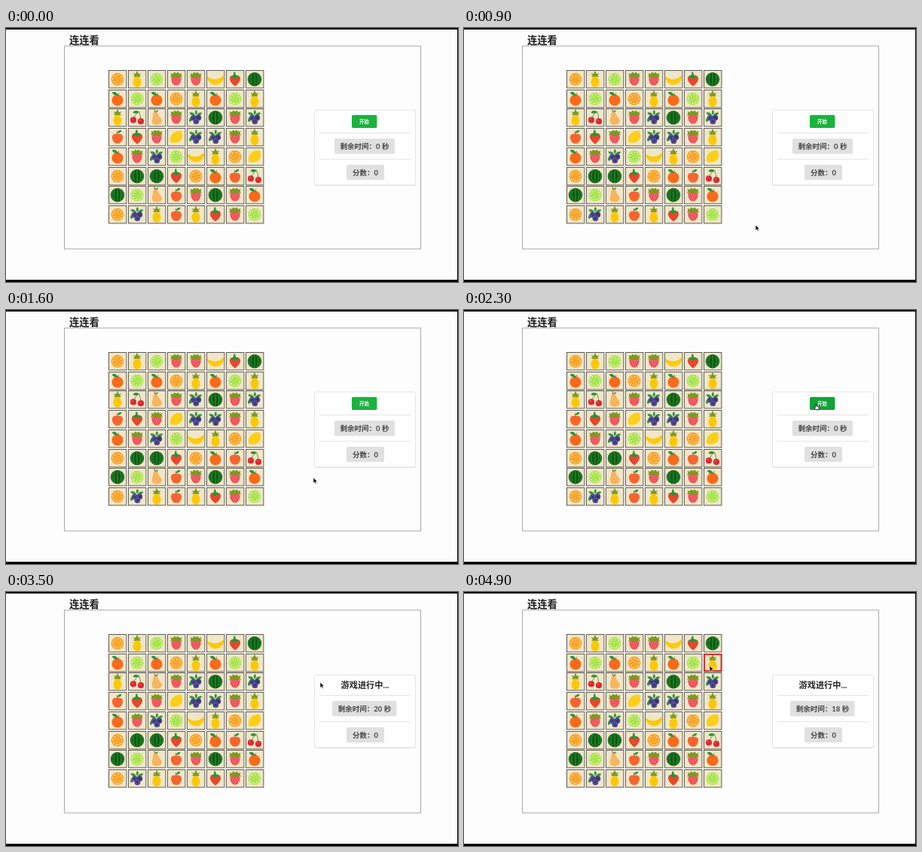
Recreate the animation shown at these times as an HTML page. Size 600 by 338 pixels, loop 5000 ms.

```html
<!DOCTYPE html>
<html lang="zh-CN">
<head>
<meta charset="utf-8">
<title>连连看</title>
<style>
  html, body { margin: 0; width: 100%; height: 100%; overflow: hidden; background: #fdfdfd; }
  svg { display: block; width: 600px; height: 338px; }
  text { font-family: Lato, "Noto Sans CJK SC", "Noto Sans CJK", sans-serif; font-weight: 700; }
  .mid { text-anchor: middle; }
  .label { font-size: 9.5px; fill: #454545; }
  .chip { fill: #e0e0e0; }
  .rule { stroke: #e4e4e4; }
</style>
</head>
<body>
<svg id="stage" viewBox="0 0 600 338">
  <rect width="600" height="338" fill="#fdfdfd"/>
  <path d="M0 0H600V338H0V335H599V2H0Z" fill="#000"/>
  <text x="84" y="20.8" font-size="13.3" fill="#1c1c1c">连连看</text>
  <rect x="77.5" y="24" width="473" height="270" fill="none" stroke="#a8a8a8"/>
  <g id="board"></g>
  <rect id="pick" x="319" y="83" width="22.5" height="22" fill="none" stroke="#e3211c" stroke-width="1.8"/>

  <g id="idle">
    <rect x="409.5" y="110" width="134.5" height="100" rx="2" fill="#dcdcdc"/>
    <rect x="409.5" y="109" width="134" height="100" rx="2" fill="#fefefe" stroke="#e4e4e4"/>
    <rect id="button" x="459" y="115.8" width="33.4" height="17.2" rx="1.8"/>
    <text class="mid" x="475.5" y="127" font-size="6.4" fill="#fff">开始</text>
    <path class="rule" d="M416 139.7H537M416 174.7H537"/>
    <rect class="chip" x="436" y="147.3" width="80" height="20.2" rx="2"/>
    <text class="mid label" x="476" y="160.9">剩余时间：0 秒</text>
    <rect class="chip" x="452" y="182" width="50" height="20.2" rx="2"/>
    <text class="mid label" x="477" y="195.8">分数：0</text>
  </g>

  <g id="running">
    <rect x="409.5" y="111.5" width="134.5" height="96.5" rx="2" fill="#dcdcdc"/>
    <rect x="409.5" y="110.5" width="134" height="96.5" rx="2" fill="#fefefe" stroke="#e4e4e4"/>
    <text class="mid" x="476.5" y="128" font-size="11.2" fill="#262626">游戏进行中...</text>
    <path class="rule" d="M416 137.5H537M416 172.5H537"/>
    <rect class="chip" x="433" y="145" width="85.5" height="20.2" rx="2"/>
    <text id="clock" class="mid label" x="476" y="158.8"></text>
    <rect class="chip" x="452" y="180" width="50" height="20.2" rx="2"/>
    <text class="mid label" x="477" y="193.8">分数：0</text>
  </g>

  <g id="cursor">
    <path id="arrow" d="M0 0V7.4L1.8 5.9L3 8.6L4.3 8L3.1 5.5H5.4Z" fill="#0a0a0a" stroke="#fff" stroke-width=".6"/>
    <path id="hand" d="M1 .6Q2-.5 2.6.8L3 3L5.3 3.5Q6.6 3.8 6.3 5.2L5.7 7.8H2.3L-.2 5Q-.6 3.8 .6 4.1L1.5 4.7Z" fill="#fff" stroke="#111" stroke-width=".9"/>
  </g>
</svg>

<script>
const $ = id => document.getElementById(id);

const path = (d, fill) => `<path d="${d}" fill="${fill}"/>`;
const line = (d, color, width = 1) =>
  `<path d="${d}" fill="none" stroke="${color}" stroke-width="${width}" stroke-linecap="round"/>`;
const disc = (x, y, r, fill) => `<circle cx="${x}" cy="${y}" r="${r}" fill="${fill}"/>`;
const oval = (x, y, rx, ry, fill, turn = 0) =>
  `<ellipse cx="${x}" cy="${y}" rx="${rx}" ry="${ry}" fill="${fill}" transform="rotate(${turn} ${x} ${y})"/>`;

const slice = (rim, pith, flesh) =>
  disc(12, 12.3, 8.3, rim) + disc(12, 12.3, 6.9, pith) +
  `<circle cx="12" cy="12.3" r="3.1" fill="none" stroke="${flesh}" stroke-width="6.2"
    pathLength="80" stroke-dasharray="8.2 1.8" transform="rotate(12 12 12.3)"/>`;

// Rows of seeds, each narrower than the one above
const seeds = (color, r) => {
  let s = "";
  for (let row = 0; row < 4; row++)
    for (let i = 0; i < 4 - row; i++)
      s += disc(12 + (i - (3 - row) / 2) * 3, 11.6 + row * 2.5, r, color);
  return s;
};

const fruits = {
  O: slice("#f7960f", "#fde0a0", "#f79b17"),
  L: slice("#a6e24a", "#e6f9bd", "#9fe13c"),
  P: path("M12 10L6.5 8.2L9 7.2L6.6 4.2L10 5L12 .8L14 5L17.4 4.2L15 7.2L17.5 8.2Z", "#7b9a22") +
     oval(12, 15.8, 5.5, 7.3, "#fdcb05") +
     line("M8 12.5L15.5 21M10 10L17 17.5M16 12.5L8.5 21M14 10L7 17.5", "#f3b808", .4),
  R: path("M5.4 11Q6 8 12 8Q18 8 18.6 11Q18.8 16 15.5 19.3Q12 22 8.5 19.3Q5.2 16 5.4 11Z", "#f0525a") +
     seeds("#f68a8d", .7) +
     path("M4 9.8L5.4 7L4.6 4.2L8 5L9.4 2.6L12 4.2L14.6 2.6L16 5L19.4 4.2L18.6 7L20 9.8L15.6 8.8L12 10.6L8.4 8.8Z", "#7b9a22"),
  B: path("M.8 8.6Q6 12.4 12 12.2Q18 11.8 22 7.4L23.4 8.6Q22.6 15.6 17 18.6Q10.5 21 5 17Q1.2 13.6 .8 8.6Z", "#fdcb0c") +
     line("M2 11Q11 18 22 9.8", "#f3b808", .5),
  S: path("M4.8 11Q5.5 7.4 12 8Q18.5 7.4 19.2 11Q18.8 16.5 12 21.6Q5.2 16.5 4.8 11Z", "#ea412b") +
     seeds("#f7a355", .4) +
     path("M5 8.6L9.8 6.6L10.4 2.6L12.2 2.4L12.8 6.2L19 8.4L14.6 9.4L12 12L9.4 9.4Z", "#2c9238"),
  W: disc(12, 12.2, 9.2, "#0c5a17") +
     line("M12 3.6V20.8M8.6 4.6Q5.4 12 8.6 19.8M15.4 4.6Q18.6 12 15.4 19.8M5.4 7Q2.6 12 5.4 17.4M18.6 7Q21.4 12 18.6 17.4", "#2f9a2c", 1),
  T: disc(12, 14, 7.6, "#f96a1b") +
     path("M12.4 7.6Q6 8.2 4.8 3.6Q10.8 1.6 12.4 7.6Z", "#2c9238") + line("M12.4 7.8L13.6 5", "#73542c", .9),
  C: line("M7.5 14Q9 8 14.6 4.4M16.8 16Q17 9 14.6 4.4", "#4f8f34", .9) +
     path("M14.6 4.4Q9 1.4 6.4 5.4Q11.5 8.4 14.6 4.4Z", "#2c9238") +
     disc(7, 15.4, 4.1, "#dd2a30") + disc(17, 17.2, 4.1, "#dd2a30") +
     disc(5.8, 14, .8, "#f27f7d") + disc(15.8, 15.8, .8, "#f27f7d"),
  E: path("M9.6 4.6Q13 3.8 14 8Q15 10.6 17.6 13Q20.6 17.4 16.8 20.4Q12 23 7.6 20.8Q4.4 18 6.4 13Q7.4 10.4 7.2 8Q7.4 5.2 9.6 4.6Z", "#f8b55f") +
     line("M10 5L9 1.8", "#79552d", 1) + path("M10 5Q11 1.8 14.4 2.8Q13.8 5.4 10 5Z", "#4e9d3b"),
  A: path("M12 8.4Q15.2 7 17.8 9Q20 11.4 18.6 15.6Q16.2 21.8 12 20.4Q7.8 21.8 5.4 15.6Q4 11.4 6.2 9Q8.8 7 12 8.4Z", "#f7652f") +
     line("M12 8.6L11.4 5", "#78502a", 1) + path("M12 6.6Q12.6 2.4 17.4 3.2Q16.6 7.2 12 6.6Z", "#2c9238"),
  M: path("M18.2 4Q20 4.8 19.4 6.6Q22 12.6 17.2 17.2Q12.6 21 7.4 19.4Q5.2 20.6 4.6 18.6Q2.6 12 7.4 7.4Q12.4 3 18.2 4Z", "#fdcf17"),
  U: path("M11 9.4Q4.6 9.8 3.4 5.6Q9 4.2 11 9.4ZM12 9Q9.4 4.6 12.4 2Q15.6 5 12 9ZM13 9.4Q14.6 4.6 20.2 5.8Q18.8 10.2 13 9.4Z", "#2f9240") +
     oval(5.4, 14.5, 2, 3.4, "#2f9240", 25) +
     disc(8.8, 12.6, 3.8, "#504b94") + disc(15.4, 12.4, 3.8, "#45417f") + disc(12.4, 17.2, 3.9, "#504b94") +
     disc(8.8, 12.6, 1.2, "#312e66") + disc(15.5, 12.4, 1.2, "#2b295a") + disc(12.5, 17.3, 1.2, "#312e66")
};

const rows = ["OPLRRBSW", "TLTOPTLP", "PCERUWRU", "ASRMUURP",
              "TRULBPOM", "OWWSOTAC", "WLEARWRT", "OUPAPSRL"];

$("board").innerHTML = rows.map((row, r) => [...row].map((kind, c) =>
  `<g transform="translate(${136 + c * 26} ${Math.round(56 + r * 25.7)})">
    <rect x=".5" y=".5" width="23.4" height="23.4" fill="#f0e6c8" stroke="#5d5b53"/>${fruits[kind]}
  </g>`).join("")).join("");

const LOOP = 5000, STEP = 100;
const START = 2600, PICK = 4700;

// time, x, y of the pointer
const trail = [
  [300, 409, 336], [400, 407, 332], [600, 398, 305], [900, 387, 262],
  [1200, 394, 258], [1600, 408, 223], [1900, 437, 178], [2200, 464, 127],
  [2300, 465, 125], [2700, 465, 125], [3100, 444, 123], [3500, 417, 120],
  [3700, 406, 118], [4000, 368, 108], [4300, 331, 99], [4500, 326, 98]
];

function pointAt(t) {
  const i = trail.findIndex(p => p[0] > t);
  if (i < 0) return trail[trail.length - 1].slice(1);
  const [t0, x0, y0] = trail[i - 1], [t1, x1, y1] = trail[i];
  const k = (t - t0) / (t1 - t0);
  return [x0 + (x1 - x0) * k, y0 + (y1 - y0) * k].map(Math.round);
}

const show = (id, on) => $(id).setAttribute("visibility", on ? "visible" : "hidden");

function draw(time) {
  const t = Math.floor(time / STEP) * STEP;
  const running = t >= START;
  const moving = t >= trail[0][0];
  let hover = false;
  if (moving) {
    const [x, y] = pointAt(t);
    hover = !running && x >= 459 && x <= 492 && y >= 116 && y <= 133;
    $("cursor").setAttribute("transform", `translate(${x} ${y})`);
  }
  show("arrow", moving && !hover);
  show("hand", hover);
  show("idle", !running);
  show("running", running);
  show("pick", t >= PICK);
  $("button").setAttribute("fill", hover ? "#13a337" : "#1bb23e");
  const left = t >= 4700 ? 18 : t >= 3700 ? 19 : 20;
  $("clock").textContent = `剩余时间：${left} 秒`;
}

const origin = performance.now();
function tick() {
  draw((performance.now() - origin) % LOOP);
  requestAnimationFrame(tick);
}
tick();
</script>
</body>
</html>
```
